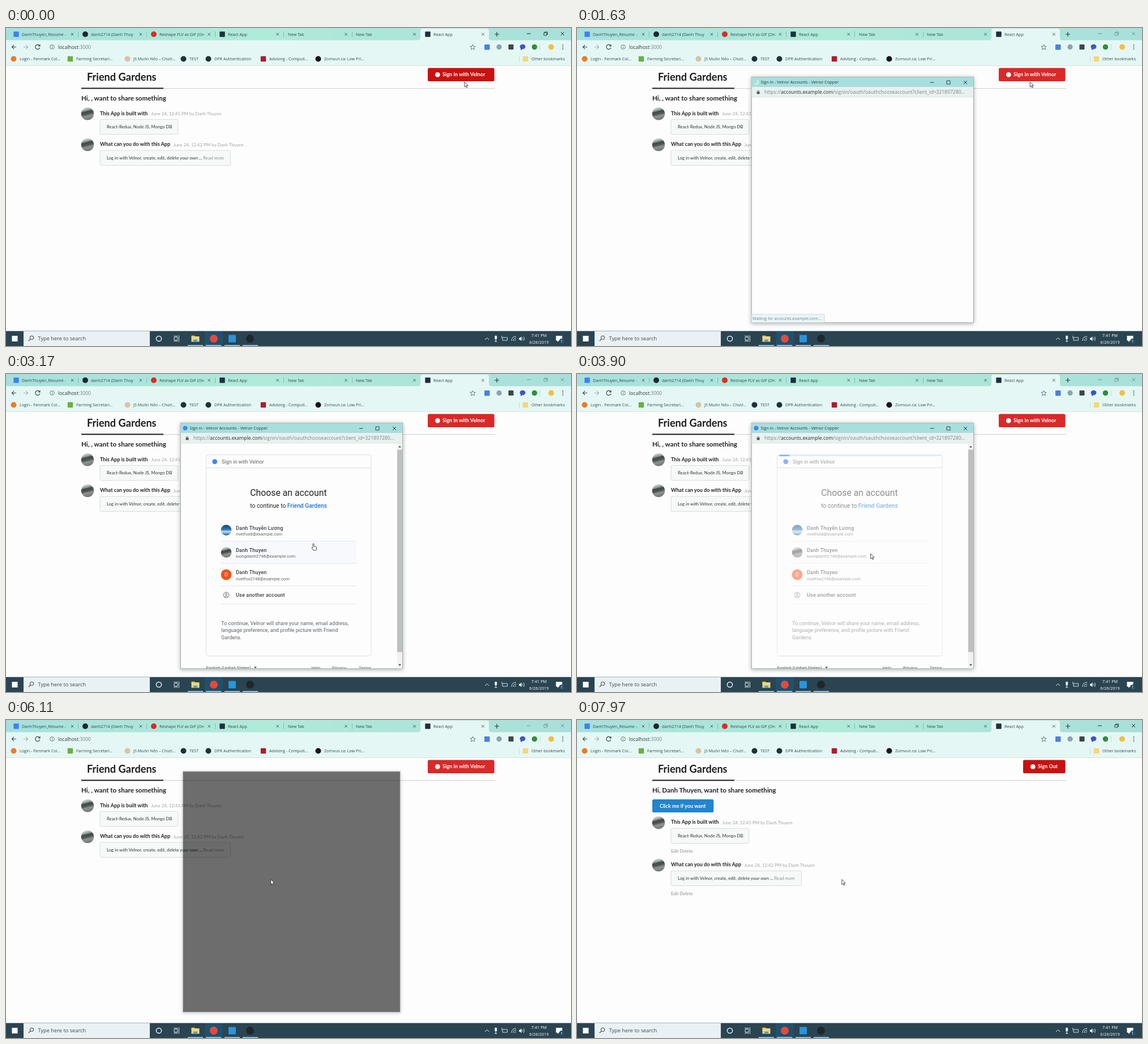
An HTML page that plays this animation: 998 px wide and 561 px high, repeating every 8 s.

```html
<!DOCTYPE html>
<html lang="en">
<head>
<meta charset="utf-8">
<title>Sign-in demo</title>
<style>
  html, body { margin: 0; height: 100%; overflow: hidden; background: #fdfdfd; }
  svg { display: block; width: 100vw; height: 100vh; }
  text { white-space: pre; }
  .ui { font-family: "Open Sans", "Noto Sans", sans-serif; }
  .page { font-family: Lato, sans-serif; }
  .card { font-family: Roboto, sans-serif; }
</style>
</head>
<body>
<svg id="stage" viewBox="0 0 998 561" preserveAspectRatio="none"></svg>
<script>
const LOOP = 8000;
const USER = "Danh Thuyen";
const HOST = "accounts.example.com";

const text = (x, y, size, str, fill = "#333", more = "") =>
  `<text x="${x}" y="${y}" font-size="${size}" fill="${fill}" ${more}>${str}</text>`;
const rect = (x, y, w, h, fill, more = "") =>
  `<rect x="${x}" y="${y}" width="${w}" height="${h}" fill="${fill}" ${more}/>`;
const circle = (x, y, r, fill, more = "") =>
  `<circle cx="${x}" cy="${y}" r="${r}" fill="${fill}" ${more}/>`;
const line = (d, stroke, width = 1, more = "") =>
  `<path d="${d}" fill="none" stroke="${stroke}" stroke-width="${width}" ${more}/>`;
const group = (id, cls, body) => `<g id="${id}" class="${cls}">${body}</g>`;
const cross = (x, y, r, color, width = 1) =>
  line(`M${x - r} ${y - r}l${2 * r} ${2 * r}m0 ${-2 * r}l${-2 * r} ${2 * r}`, color, width);
const BOLD = 'font-weight="700"';
const MEDIUM = 'font-weight="500" letter-spacing=".14"';
const MIDDLE = 'text-anchor="middle"';

const defs = `<defs>
  <linearGradient id="strip"><stop stop-color="#a6e0dd"/><stop offset=".45" stop-color="#b0ead9"/><stop offset="1" stop-color="#a9dfda"/></linearGradient>
  <linearGradient id="hills" x2=".25" y2="1"><stop offset=".15" stop-color="#c9cdce"/><stop offset=".32" stop-color="#8f9594"/><stop offset=".42" stop-color="#414745"/><stop offset=".62" stop-color="#555a58"/><stop offset=".75" stop-color="#8e9291"/><stop offset="1" stop-color="#777c7a"/></linearGradient>
  <linearGradient id="sea" x2="0" y2="1"><stop stop-color="#123f77"/><stop offset=".45" stop-color="#2c78bd"/><stop offset=".65" stop-color="#c7e0f0"/><stop offset="1" stop-color="#16518e"/></linearGradient>
  <filter id="shadow" x="-10%" y="-10%" width="120%" height="120%"><feDropShadow dx="0" dy="1.5" stdDeviation="3.5" flood-opacity=".32"/></filter>
  <clipPath id="view"><rect x="308.5" y="122" width="391.5" height="397.5"/></clipPath>
</defs>`;

function browser() {
  const tabs = [
    [28, "DanhThuyen_Resume -", "#3f82ee", 0], [150, "danh2714 (Danh Thuy", "#20262b", 1],
    [271, "Reshape FLV as GIF (On", "#e02b20", 1], [392, "React App", "#20303a", 0],
    [498, "New Tab"], [618, "New Tab"], [755, "React App", "#20303a", 0]];
  const marks = [
    [24, "Login - Fenmark Col...", "#ee7b28", 1], [124, "Farming Secretari...", "#6caf3c", 0],
    [225, "JS Muôn Nẻo – Chươ...", "#d8c3a8", 1], [324, "TEST", "#1f3336", 1],
    [368, "DPR Authentication", "#1f3336", 1], [465, "Advising - Computi...", "#b3182c", 0],
    [562, "Zomvun.ca: Low Pri...", "#161616", 1], [928, "Other bookmarks", "#f6d678", 0]];
  const icon = (x, y, color, round) => !color ? "" :
    round ? circle(x, y, 5, color) : rect(x - 4.7, y - 4.7, 9.4, 9.4, color, 'rx="1"');
  let s = rect(0, 0, 998, 22, "url(#strip)") + rect(0, 21.5, 998, 45, "#e5f7f4")
    + `<path d="M727 22q5 0 5-5V5q0-4 4-4h113q4 0 4 4v12q0 5 5 5z" fill="#e5f7f4"/>`;
  tabs.forEach(([x, name, color, round], i) => {
    s += icon(x - 10, 11, color, round) + text(x, 13.6, 7.25, name, "#30484a")
      + cross(117 + 120.9 * i, 11, 2.3, "#3c5254", .9);
    if (i < 5) s += line(`M${127.5 + 121 * i} 6v10`, "#6da8a2", .7);
  });
  s += line("M863 11h8m-4-4v8", "#263c3e", 1.2);
  s += line("M18 33.5h-7.5m3.6-3.6l-3.6 3.6 3.6 3.6", "#304a4b", 1.2)
    + line("M31 33.5h7.5m-3.6-3.6l3.6 3.6-3.6 3.6", "#9cb4b0", 1.2)
    + line("M59.2 31.2a4 4 0 1 0 .5 3.5M60 29v3h-3", "#304a4b", 1.2)
    + circle(81.5, 33.5, 3.8, "none", 'stroke="#536b6b" stroke-width=".9"') + line("M81.5 33v2.5m0-4.3v1", "#536b6b", .9)
    + text(92, 36.8, 8.6, 'localhost<tspan fill="#6d8583">:3000</tspan>', "#24393a")
    + line("M824.5 29.2l1.3 3 3.3.3-2.5 2.2.8 3.3-2.9-1.8-2.9 1.8.8-3.3-2.5-2.2 3.3-.3z", "#536b6b", .9)
    + rect(845, 29, 9.5, 9.5, "#4b82dc", 'rx="1"') + circle(871, 33.5, 4.7, "#87a6b5")
    + rect(887.5, 29, 9, 9, "#3d474a", 'rx="1"') + `<ellipse cx="912.5" cy="33" rx="5" ry="4.2" fill="#3d57c4"/><path d="M909 35v4l4-2z" fill="#3d57c4"/>`
    + circle(933.5, 33.5, 4.8, "#2f8f3c") + line("M943.5 28v11", "#b8d7d0", .8) + circle(963, 33.5, 5, "#f3bf42")
    + [30, 33.5, 37].map(y => circle(983.5, y, 1, "#40595a")).join("");
  for (const [x, name, color, round] of marks)
    s += icon(x - 10.5, 54.5, color, round) + text(x, 57.3, 7.2, name, "#334b4c");
  s += line("M906.5 49v11", "#b8d7d0", .8) + line("M0 66.5h998", "#cfdfdb", .8);
  return s + group("controls", "", line("M920 10h7", "#1d3234")
    + line("M950 8.5h5v4.5h-5zM951.5 8.5v-1.5h5v4.5h-1.5", "#1d3234", .9) + cross(983, 10, 3, "#1d3234"));
}

function post(y, title, metaX, meta, boxWidth, body, editable) {
  return circle(144, y, 11.2, "url(#hills)") + text(166, y + 2.2, 9.1, title, "#222", BOLD)
    + text(metaX, y + 2.6, 7.9, `${meta} by ${USER}`, "#a4a4a4")
    + rect(166, y + 10, boxWidth, 26.3, "#f7f8f8", 'rx="2" stroke="#d3d6d9" stroke-width=".9"')
    + text(178, y + 25.8, 7.75, body, "#333")
    + (editable ? text(166, y + 53.2, 7.9, "Edit Delete", "#8d8d8d") : "");
}
const posts = (y1, y2, editable) =>
  post(y1, "This App is built with", 256.5, "June 24, 12:41 PM", 137.7, "React-Redux, Node JS, Mongo DB", editable)
  + post(y2, "What can you do with this App", 295.5, "June 24, 12:42 PM", 230.5,
    'Log in with Velnor, create, edit, delete your own ... <tspan fill="#8f8f8f">Read more</tspan>', editable);
const button = (id, x, label) => rect(x, 70.6, 862.6 - x, 23.4, "#ca1010", `id="${id}" rx="2.6"`)
  + circle(x + 17.3, 82.3, 4.4, "#fff") + text(x + 26, 85.4, 9.1, label, "#fff", BOLD);

const page = rect(0, 67, 998, 468, "#fdfdfd")
  + line("M133 106.6h731", "#d4d5d4", 1.3) + rect(133, 105.4, 145, 2, "#1b1c1d")
  + text(143, 93.3, 18.15, "Friend Gardens", "#1b1c1d", BOLD)
  + group("guest", "", button("signIn", 745, "Sign in with Velnor")
    + text(133, 127.6, 11.6, "Hi, , want to share something", "#222", BOLD) + posts(151.3, 206, false))
  + group("member", "", button("signOut", 788, "Sign Out")
    + text(133, 127.6, 11.6, `Hi, ${USER}, want to share something`, "#222", BOLD)
    + rect(133, 140, 108.3, 23, "#2185d0", 'rx="2.6"') + text(146, 154.7, 9.1, "Click me if you want", "#fff", BOLD)
    + posts(181.2, 256, true));

function taskbar() {
  const light = "#e6f1f4";
  let s = rect(0, 534.6, 998, 27, "#2a4452") + rect(31, 535, 223, 26, "#e9f1f4") + rect(10.5, 543, 10, 10, "#fff")
    + circle(45.6, 546.3, 3.2, "none", 'stroke="#333" stroke-width="1"') + line("M43.2 548.6l-3.4 3.6", "#333", 1.1)
    + text(56.5, 551.4, 9.25, "Type here to search", "#3d4a50")
    + circle(270, 548, 4.6, "none", `stroke="${light}" stroke-width="1.5"`)
    + line("M297 545.5h6v5h-6zM297 542.5v1.2h6v-1.2m-6 11v-1.2h6v1.2M305.5 542.5v11", light, .9)
    + rect(351, 535, 32, 26, "#22506c")
    + rect(327.5, 542.5, 6, 4, "#e3ac3c") + rect(327.5, 544, 14, 9.5, "#f8d675") + rect(331, 549.5, 7, 4, "#46a4dc")
    + circle(367, 548, 7, "#e24a3b") + rect(393, 541.5, 13, 13, "#2a94dc", 'rx="1"') + circle(431, 548, 7, "#20262a");
  for (const x of [321, 353, 386, 418]) s += rect(x, 559.2, 27, 1.8, "#8cc6e8");
  s += line("M846 550l3.6-3.6 3.6 3.6", light) + rect(863.2, 542.5, 4, 7, light, 'rx="2"')
    + line("M865.2 549v4m-2.2 0h4.4", light)
    + line("M877 546h8.5v5h-8.5zM876 543v4", light, .9)
    + line("M893 552q0-8 8-8m-5 8q0-5 5-5m-2.3 5q0-2.3 2.3-2.3", light, .9)
    + `<path d="M906 546.5h2l2.6-2.3v8l-2.6-2.3h-2z" fill="${light}"/>` + line("M912.4 546q1.5 2.2 0 4.4m2-6q2.7 3.8 0 7.6", light, .8)
    + text(941.5, 544.6, 7.3, "7:41 PM", "#fff", MIDDLE) + text(941.5, 556.8, 7.3, "6/26/2019", "#fff", MIDDLE)
    + `<path d="M971.5 543h11v8.5h-6l-2.5 2.5v-2.5h-2.5z" fill="#fff"/>`
    + circle(981.7, 552.3, 4.6, "#23516a") + text(981.7, 554.7, 6.5, "1", "#fff", MIDDLE);
  return s;
}

function chooser() {
  const grey = "#5f6368", rule = y => line(`M380 ${y}h239`, "#dcdee1", .8);
  const account = (y, fill, name, mail) => circle(389, y, 9.4, fill)
    + text(406, y - .8, 9.1, name, "#3c4043", MEDIUM)
    + `<g class="mail">${text(406, y + 9.6, 7.6, mail, grey)}</g>`;
  const body = rect(353.5, 142.4, 291.5, 355, "#fdfdfd", 'rx="4" stroke="#dcded9" stroke-width=".9"')
    + circle(368.7, 154.6, 4.4, "#4285f4") + text(381, 158.2, 9.1, "Sign in with Velnor", grey)
    + line("M354 165.5h291", "#dcded9", .9)
    + text(499, 214.6, 15.8, "Choose an account", "#202124", MIDDLE)
    + text(499, 236.4, 10.3, 'to continue to <tspan fill="#1a73e8" font-weight="500">Friend Gardens</tspan>', "#202124", MIDDLE)
    + rect(380, 295.5, 239, 38, "#f7f9fc", 'id="rowHover"')
    + account(275.3, "url(#sea)", "Danh Thuyễn Lương", "rivetfox8@example.com") + rule(295)
    + account(314.7, "url(#hills)", USER, "luongdanh2748@example.com") + rule(334)
    + account(354, "#f4511e", USER, "rivetfox2748@example.com") + rule(373.6)
    + text(389, 357.3, 9, "D", "#fff", MIDDLE)
    + circle(389, 389.8, 4.9, "none", 'stroke="#5f6368" stroke-width=".9"') + circle(389, 388.5, 1.6, "none", 'stroke="#5f6368" stroke-width=".9"')
    + line("M385.6 393q3.4-3 6.8 0", grey, .9)
    + text(406, 392.8, 9.1, "Use another account", "#3c4043", MEDIUM) + rule(405.6)
    + text(380, 442.5, 9.1, "To continue, Velnor will share your name, email address,", grey)
    + text(380, 455.3, 9.1, "language preference, and profile picture with Friend", grey)
    + text(380, 468.2, 9.1, "Gardens.", grey)
    + text(353.5, 520.5, 7.8, "English (United States)", "#555") + `<path d="M438 516.5h5l-2.5 2.8z" fill="#444"/>`
    + text(539.5, 520.5, 7.8, "Help", "#666") + text(576, 520.5, 7.8, "Privacy", "#666") + text(623, 520.5, 7.8, "Terms", "#666");
  return body + rect(353.5, 166, 291.5, 331, "#fdfdfd", 'id="veil" opacity=".5"')
    + rect(354, 142.4, 291, 22.5, "#fdfdfd", 'id="headVeil" opacity=".4"')
    + group("progress", "", rect(354, 142.5, 291, 2.6, "#e3edf6") + rect(354, 142.5, 18, 2.6, "#86b4ea", 'id="bar"'))
    + rect(691, 122, 9, 398, "#f1f1f1") + rect(691, 133.5, 9, 357, "#bdbfc0")
    + `<path d="M693 129.5h5l-2.5-3zM693 512h5l-2.5 3z" fill="#505050"/>`;
}

const address = (path) =>
  text(331, 116.2, 8.6, `https://<tspan fill="#1f2a2c">${HOST}</tspan>${path}`, "#7b8487");
const popup = group("popup", "ui",
  rect(308.3, 86.3, 392, 433.5, "#fdfdfd", 'id="sheet" stroke="#93a09f" stroke-width=".9" filter="url(#shadow)"')
  + group("chrome", "", rect(308.7, 86.7, 391.2, 17.3, "#a8dedb") + rect(308.7, 104, 391.2, 18, "#e8f1f0")
    + line("M308 122h392.5", "#d4dcda", .7)
    + line("M624 96h6.5", "#20383a") + line("M653 93h6v6h-6z", "#20383a", .9) + cross(686, 96, 3, "#20383a")
    + rect(317.6, 112.4, 5, 4, "#4c5759") + line("M318.7 112.6v-1.4q1.4-2 2.8 0v1.4", "#4c5759", .9)
    + circle(316.5, 95.5, 3.6, "none", 'id="spinner" stroke="#f4fffd" stroke-width="1.3" stroke-dasharray="13 10"')
    + circle(316.5, 95.5, 4, "#4285f4", 'id="favicon"')
    + group("chooseBar", "", text(324.5, 98.2, 7.25, "Sign in - Velnor Accounts - Velnor Copper", "#22393b")
      + address("/signin/oauth/oauthchooseaccount?client_id=321897280..."))
    + group("consentBar", "", text(325, 98.2, 7.2, `https://${HOST}/signin/oauth/consent?authuser=1&amp;part=AJi8hAMf...`, "#22393b")
      + address("/signin/oauth/consent?authuser=1&amp;part=AJi8hAMf_vnED...")))
  + `<g clip-path="url(#view)">` + group("chooser", "card", chooser())
  + group("consent", "", line("M505 181q1.5-1 3 .8", "#555", 1)
    + text(504.7, 219.8, 9.1, "One moment please...", "#222", MIDDLE + ' font-family="Liberation Sans, sans-serif"')
    + rect(308, 509, 392, 10.5, "#f1f1f1") + rect(318, 509.5, 349, 9.5, "#c2c3c4") + `<path d="M694 511.7v5l3-2.5z" fill="#505050"/>`)
  + group("status", "", rect(307, 505, 130, 16, "#eaf6f5", 'rx="1.5" stroke="#c3d3d2" stroke-width=".8"')
    + text(310, 515.3, 7.2, `Waiting for ${HOST}...`, "#6f8486")) + `</g>`);

const pointer = group("arrow", "", `<path d="M0 0v9l2.1-1.9 1.5 3.2 1.4-.6-1.5-3.2h2.8z" fill="#fff" stroke="#222" stroke-width=".8"/>`)
  + group("hand", "", `<path d="M-1 1q1-2 2 0v4l4 1q1 .4 .8 2l-.8 4h-5l-3-4.2q.4-1.4 2-.2z" fill="#fff" stroke="#222" stroke-width=".8"/>`);

const stage = document.getElementById("stage");
stage.innerHTML = defs + group("browser", "ui", browser()) + group("page", "page", page)
  + popup + group("taskbar", "ui", taskbar()) + group("pointer", "", pointer);

const el = id => document.getElementById(id);
const show = (id, on) => el(id).style.display = on ? "" : "none";
const set = (id, name, value) => el(id).setAttribute(name, value);
const progress = (t, from, to) => Math.min(1, Math.max(0, (t - from) / (to - from)));
const smooth = p => p * p * (3 - 2 * p);

// Pointer stops: time, x, y
const route = [[0, 809.8, 95], [400, 809.8, 95], [850, 812, 85.5], [1500, 812, 85.5], [2350, 627.7, 236],
  [2650, 627.7, 236], [3400, 518.7, 317], [4050, 518.7, 317], [4650, 464.5, 283], [5200, 464.5, 283], [5600, 467.8, 281.3], [8000, 467.8, 281.3]];
function pointerAt(t) {
  const i = route.findIndex(stop => stop[0] > t);
  const [t0, x0, y0] = route[i - 1], [t1, x1, y1] = route[i];
  const p = smooth((t - t0) / (t1 - t0));
  return [x0 + (x1 - x0) * p, y0 + (y1 - y0) * p];
}

function draw(t) {
  const [x, y] = pointerAt(t);
  const overButton = x > 745 && y < 94;
  const overRow = t > 2500 && t < 3750 && y > 295 && y < 334 && x < 619;
  set("pointer", "transform", `translate(${x} ${y})`);
  show("hand", overButton || overRow);
  show("arrow", !overButton && !overRow);

  const signedIn = t >= 6900, away = t >= 1180 && t < 6150;
  show("guest", !signedIn);
  show("member", signedIn);
  set("controls", "opacity", away ? .4 : 1);
  set("signIn", "fill", overButton ? "#d01919" : away ? "#db2828" : "#ca1010");

  const open = 1 - (1 - progress(t, 1170, 1370)) ** 2, close = progress(t, 6050, 6200);
  const scale = .9 + .1 * open - .05 * close;
  show("popup", open > 0 && close < 1);
  set("popup", "opacity", close ? .95 * (1 - close) : open);
  set("popup", "transform", `translate(504.3 303) scale(${scale}) translate(-504.3 -303)`);
  set("sheet", "fill", close ? "#000" : "#fdfdfd");

  const leaving = t >= 4300, picked = t >= 3750, loaded = t >= 2570;
  show("chrome", t >= 1370 && !close);
  show("chooseBar", !leaving);
  show("consentBar", leaving);
  show("favicon", loaded && !leaving);
  show("spinner", !loaded || leaving);
  set("spinner", "transform", `rotate(${t * .4 % 360} 316.5 95.5)`);
  show("chooser", t >= 2000 && !leaving);
  show("consent", leaving && !close);
  document.querySelectorAll(".mail").forEach(m => m.style.display = loaded ? "" : "none");
  show("rowHover", overRow);
  for (const id of ["veil", "headVeil", "progress"]) show(id, picked);
  const sweep = progress(t, 3850, 4300);
  set("bar", "x", 354 + 273 * sweep * sweep);
  show("status", (t >= 1450 && t < 2600 || leaving) && !close);
  set("status", "opacity", leaving ? 1 : 1 - progress(t, 2400, 2600));
}

function tick() {
  draw(performance.now() % LOOP);
  requestAnimationFrame(tick);
}
tick();
</script>
</body>
</html>
```
